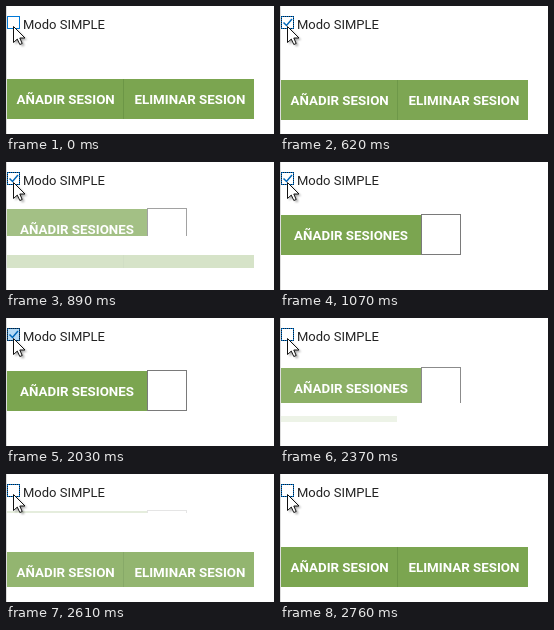
Recreate the animation shown at these times as an HTML page. Size 268 px wide and 128 px high, loop 3.12 s.

```html
<!DOCTYPE html>
<html lang="es">
<head>
<meta charset="utf-8">
<style>
  html, body { margin: 0; width: 100%; height: 100%; overflow: hidden; background: #fff; }
  #stage { position: relative; width: 268px; height: 128px; overflow: hidden; background: #fff; }
  #stage > * { position: absolute; }
  #edge { left: 0; top: 0; width: 1px; height: 128px; background: #dcdcdc; }
  #label { left: 17px; top: 10px; font: 13px/17px Roboto, sans-serif; color: #222; white-space: nowrap; }
  .row { left: 1px; overflow: hidden; }
  .row > * { float: left; box-sizing: border-box; height: 40px; }
  .btn { background: #7ba550; color: #fff; font: 700 13.33px/41px Roboto, sans-serif; white-space: nowrap; }
  #single { width: 140px; padding-left: 13px; margin-top: 7px; }
  #add { width: 116px; padding-left: 9.5px; }
  #del { width: 131px; padding-left: 10.5px; border-left: 1px solid #6c9646; }
  #simple > #count { width: 40px; height: 41px; margin-top: 6px; border: 1px solid #7a7a7a; background: #fff; }
  #box, #cursor { left: 0; top: 0; }
</style>
</head>
<body>
<div id="stage">
  <div id="edge"></div>
  <div id="label">Modo SIMPLE</div>
  <div id="simple" class="row"><div id="single" class="btn">AÑADIR SESIONES</div><div id="count"></div></div>
  <div id="full" class="row"><div id="add" class="btn">AÑADIR SESION</div><div id="del" class="btn">ELIMINAR SESION</div></div>
  <svg id="box" width="30" height="30" fill="none">
    <rect id="frame" x="1.5" y="10.5" width="12" height="12" stroke="#0078d7"/>
    <path id="tick" d="M3.5 16.5l3 3 5.5-6.5" stroke="#0067b8" stroke-width="1.5"/>
    <rect id="focus" x="1.5" y="10.5" width="12" height="12" stroke="#10202e" stroke-dasharray="1 1" stroke-dashoffset=".5"/>
  </svg>
  <svg id="cursor" width="40" height="50">
    <defs><filter id="blur" x="-50%" y="-50%" width="200%" height="200%"><feGaussianBlur stdDeviation="1"/></filter></defs>
    <path d="M9.5 22.5v16l4-3.4 2.5 5.4 2.5-1-2.4-5.5h5z" fill="#000" opacity=".35" filter="url(#blur)"/>
    <path d="M7.5 20.5v16l3.8-3.4 2.5 5.4 2.4-1-2.4-5.5h5.2z" fill="#fff" stroke="#111"/>
  </svg>
</div>
<script>
const LOOP = 3120, SLIDE = 500, WIDTH = 1140;
const $ = id => document.getElementById(id);
const swing = t => .5 - Math.cos(Math.PI * Math.min(1, Math.max(0, t / SLIDE))) / 2;

function place(id, p, top, height) {
  const s = $(id).style;
  s.display = p > 0 ? 'block' : 'none';
  s.top = Math.round(top) + 'px';
  s.height = Math.round(height * p) + 'px';
  s.width = WIDTH * p + 'px';
  s.opacity = p;
}

function draw(t) {
  const p = swing(t - 577) - swing(t - 2254);   // 1 = simple mode
  place('simple', p, 26 + 20 * p, 48.6);
  place('full', 1 - p, 73 + 29 * p, 43);

  const pressed = t >= 530 && t < 560 || t >= 2030 && t < 2090;
  $('frame').setAttribute('fill', pressed ? '#b5daf5' : '#fff');
  $('frame').setAttribute('stroke', pressed ? '#00549a' : '#0078d7');
  $('tick').style.display = t >= 560 && t < 2090 ? '' : 'none';
  $('focus').style.display = t >= 530 ? '' : 'none';
}

const start = performance.now();
function tick() {
  draw((performance.now() - start) % LOOP);
  requestAnimationFrame(tick);
}
tick();
</script>
</body>
</html>
```
